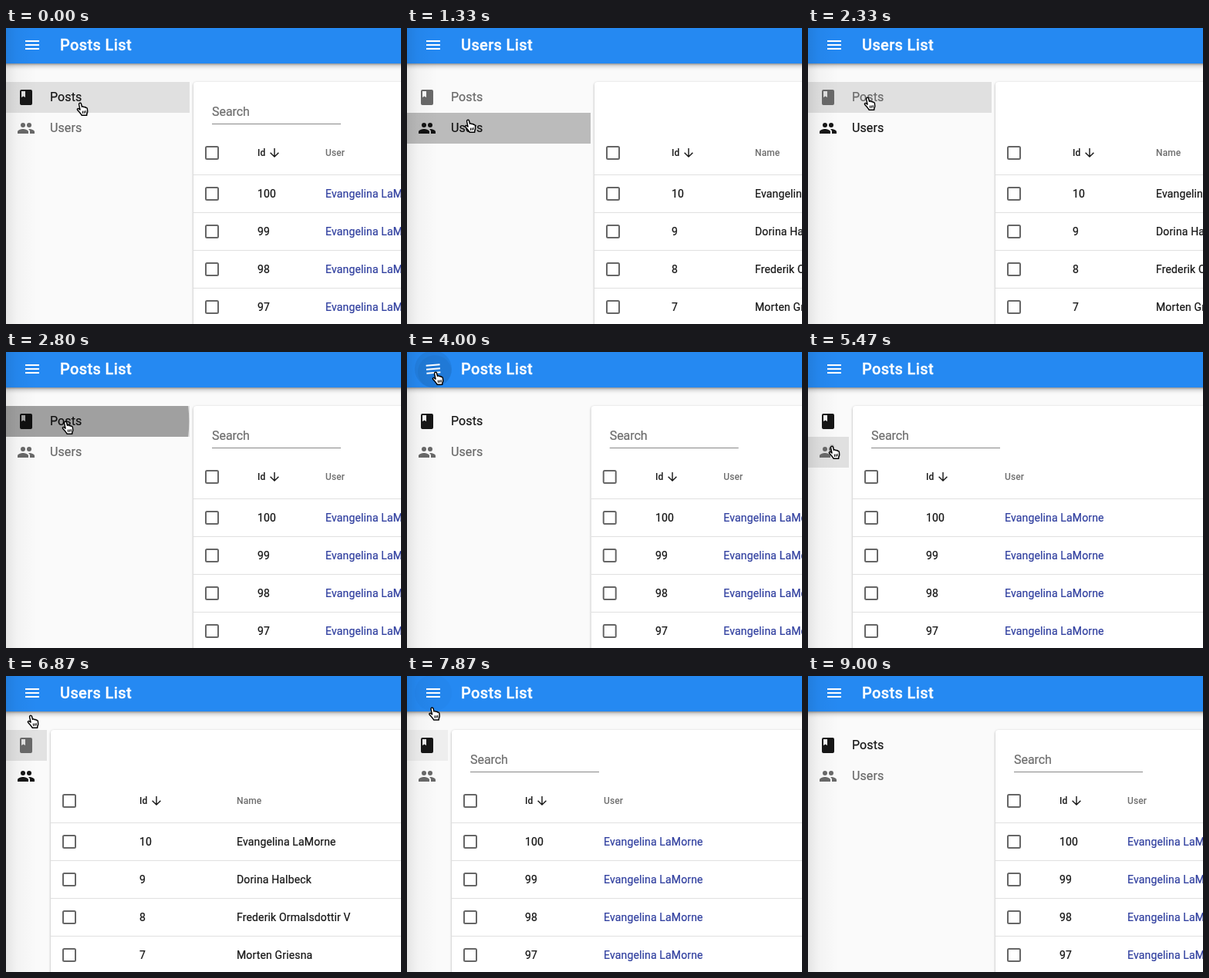
Write an HTML page that moves like this. It is 512 px wide and 384 px high and loops after 9740 ms.

```html
<!DOCTYPE html>
<html lang="en">
<head>
<meta charset="utf-8">
<title>Admin menu</title>
<style>
  html, body { margin: 0; width: 100%; height: 100%; overflow: hidden; background: #fafafa; }
  svg { display: block; width: 512px; height: 384px; }
  text {
    font-family: Roboto, sans-serif; font-size: 14px; letter-spacing: .15px; white-space: pre;
    color: #161616; fill: currentColor; stroke: currentColor; stroke-width: .22px;
  }
  .title { font-size: 20px; font-weight: 500; color: #fff; letter-spacing: .36px; stroke-width: .35px; }
  .menu { font-size: 16px; letter-spacing: .1px; }
  .hint { font-size: 16px; letter-spacing: -.05px; color: #6e6e6e; }
  .head { font-size: 12px; font-weight: 500; color: #6e6e6e; letter-spacing: .1px; stroke-width: 0; }
  .sorted { color: #161616; }
  .link { color: #303f9f; }
  .card { filter: drop-shadow(0 1px 1.5px rgba(0, 0, 0, .32)); }
  .bar { filter: drop-shadow(0 1px 1px rgba(0, 0, 0, .25)) drop-shadow(0 2px 3px rgba(0, 0, 0, .32)); }
</style>
</head>
<body>
<svg id="stage" viewBox="0 0 512 384">
  <defs>
    <linearGradient id="shade">
      <stop offset="0" stop-opacity=".085"/>
      <stop offset=".35" stop-opacity=".028"/>
      <stop offset="1" stop-opacity="0"/>
    </linearGradient>
    <clipPath id="side"><rect id="sideBox" y="46" height="338"/></clipPath>
    <clipPath id="row0"><rect class="rowBox" y="70" height="40"/></clipPath>
    <clipPath id="row1"><rect class="rowBox" y="110" height="40"/></clipPath>
    <clipPath id="round"><circle cx="34" cy="22" r="24"/></clipPath>
  </defs>
  <rect width="512" height="384" fill="#fafafa"/>

  <g clip-path="url(#side)">
    <rect class="hover" y="70" width="240" height="40"/>
    <rect class="hover" y="110" width="240" height="40"/>
    <g class="item">
      <path transform="translate(14 78)" fill-rule="evenodd"
        d="M18 2H6a2 2 0 0 0-2 2v16a2 2 0 0 0 2 2h12a2 2 0 0 0 2-2V4a2 2 0 0 0-2-2zM6 4h5v8l-2.500-1.500L6 12z"/>
      <text class="menu" x="57" y="95">Posts</text>
    </g>
    <g class="item">
      <g transform="translate(14 118)">
        <circle cx="8" cy="8" r="3"/>
        <circle cx="16" cy="8" r="3"/>
        <path d="M8 13c-2.300 0-7 1.200-7 3.500V19h14v-2.500C15 14.200 10.300 13 8 13z"/>
        <path d="M16 13h-1c1.200.9 2 2 2 3.500V19h6v-2.500C23 14.200 18.300 13 16 13z"/>
      </g>
      <text class="menu" x="57" y="135">Users</text>
    </g>
    <g clip-path="url(#row0)"><circle class="wave"/></g>
    <g clip-path="url(#row1)"><circle class="wave"/></g>
  </g>

  <g id="panel">
    <rect class="card" y="70" width="520" height="330" rx="4" fill="#fff"/>
    <g id="grid"></g>
  </g>

  <rect class="bar" x="-8" y="-8" width="528" height="54" fill="#2589f2"/>
  <rect width="40" height="384" fill="url(#shade)"/>
  <circle id="halo" cx="34" cy="22" r="24"/>
  <g clip-path="url(#round)"><circle class="wave"/></g>
  <path id="burger" d="M25 17h18M25 22h18M25 27h18" stroke="#fff" stroke-width="2"/>
  <text class="title" id="title" x="70" y="28.500"></text>

  <g id="hand">
    <g transform="translate(-.5 0) scale(1.06)">
      <path d="M3.200 1.600c.9-.8 2.200-.4 2.500.7l.9 3.600c1-.7 2-.4 2.300.4 1-.5 1.900-.1 2.200.7 1-.3 1.900.2 2 1.300l.3 3c.1 1.600-.6 2.400-.9 3.400v1.600H6.300c-.5-1.600-2-2.700-3-4.100L1 9.600C.3 8.600 1.600 7.500 2.600 8.200l1.700 1.300L3 3.600c-.2-.8-.2-1.500.2-2z"
        fill="#fff" stroke="#000" stroke-width="1.350" stroke-linejoin="round"/>
      <path d="M7.300 11l.4 3M9.200 10.800l.3 3M11 10.500l.2 3" stroke="#000"/>
    </g>
  </g>
</svg>
<script>
const LOOP = 9740, TICK = 200 / 3;
const $ = id => document.getElementById(id);
const all = q => [...document.querySelectorAll(q)];

const pages = [
  { title: 'Posts List', column: 'User', ids: [100, 99, 98, 97],
    names: Array(4).fill('Evangelina LaMorne'), style: 'link', wide: [83, 171], slim: [95, 197] },
  { title: 'Users List', column: 'Name', ids: [10, 9, 8, 7],
    names: ['Evangelina LaMorne', 'Dorina Halbeck', 'Frederik Ormalsdottir V', 'Morten Griesna'],
    style: '', wide: [100, 208], slim: [115, 241] }
];

// Times in ms
const moves = [[0, 92, 96], [70, 92, 96], [400, 75, 118], [1730, 75, 118], [2000, 73, 89],
  [3330, 73, 89], [3530, 33, 25], [4670, 33, 25], [5130, 27, 121], [6670, 27, 121],
  [6867, 28, 50], [6940, 29, 30], [7070, 27, 84], [7730, 27, 84], [7930, 29, 26],
  [8730, 29, 26], [9000, 522, 310]];
const hovers = [
  [[-300, 220], [1830, 3370], [4770, 4900], [6690, 6860], [6990, 7800]],
  [[220, 1830], [4900, 6730]],
  [[3440, 4730], [6900, 6980], [7830, 8750]]
];
const waves = [
  [[2330, 2760, 78, 90, 161], [7070, 7150, 32, 86, 42]],
  [[760, 1180, 80, 119, 162], [5380, 5800, 31, 123, 42]],
  [[3670, 4100, 36, 26, 30], [8000, 8250, 34, 27, 30]]
];
const switches = [1000, 2530, 5670, 7200];
const shut = [3965, 195], reopen = [8130, 225];

const clamp = v => Math.max(0, Math.min(1, v));
const ease = u => u < .5 ? 4 * u ** 3 : 1 - (2 - 2 * u) ** 3 / 2;
const smooth = u => u * u * (3 - 2 * u);
const ramp = (t, start, span) => clamp((t - start) / span);

const box = y =>
  `<rect x="16" y="${y - 8}" width="16" height="16" rx="1.500" fill="none" stroke="#666" stroke-width="2"/>`;

function buildPage(p, i) {
  let fixed = box(162), first = '', second = '';
  if (!i) fixed += '<text class="hint" x="24" y="114">Search</text><path d="M24 124.500h167" stroke="#888"/>';
  first += '<text class="head sorted" y="166">Id</text>' +
    '<path d="M22 156v11M16.600 161.700l5.400 5.400 5.400-5.400" fill="none" stroke="#161616" stroke-width="1.400"/>';
  second += `<text class="head" y="166">${p.column}</text>`;
  p.ids.forEach((id, r) => {
    const y = 215 + 49 * r;
    fixed += `<path d="M0 ${y - 24.5}h520" stroke="#e0e0e0"/>` + box(y);
    first += `<text y="${y + 5}">${id}</text>`;
    second += `<text class="${p.style}" y="${y + 5}">${p.names[r]}</text>`;
  });
  return `<g class="page">${fixed}<g class="col">${first}</g><g class="col">${second}</g></g>`;
}
$('grid').innerHTML = pages.map(buildPage).join('');

const pageEls = all('.page'), cols = all('.col'), items = all('.item');
const hoverEls = [...all('.hover'), $('halo')], waveEls = all('.wave'), rowBoxes = all('.rowBox');
const hoverDepth = [.105, .105, .07];
const waveDepth = [.3, .3, .06];

function drawHand(t) {
  const hand = $('hand');
  const n = moves.findIndex(m => m[0] > t);
  hand.style.display = n < 0 ? 'none' : '';
  if (n < 0) return;
  const [t0, x0, y0] = moves[n - 1], [t1, x1, y1] = moves[n];
  const u = smooth((t - t0) / (t1 - t0));
  hand.setAttribute('transform', `translate(${x0 + (x1 - x0) * u} ${y0 + (y1 - y0) * u})`);
}

function drawWave(el, list, depth, t) {
  const w = list.filter(v => v[0] <= t).pop();
  if (!w) return el.setAttribute('fill-opacity', 0);
  const [start, fade, x, y, size] = w;
  const grow = smooth(ramp(t, start, 500));
  const left = 1 - smooth(ramp(t, fade, 330));
  el.setAttribute('cx', x);
  el.setAttribute('cy', y);
  el.setAttribute('r', size * grow);
  el.setAttribute('fill-opacity', depth * (.3 + .7 * grow) * left);
}

function draw(t) {
  const page = switches.filter(s => s <= t).length % 2;
  const closed = ease(ramp(t, ...shut)) - ease(ramp(t, ...reopen));
  const left = 243 - 185 * closed;

  $('title').textContent = pages[page].title;
  $('panel').setAttribute('transform', `translate(${left} 0)`);
  $('sideBox').setAttribute('width', left - 5);
  rowBoxes.forEach(r => r.setAttribute('width', left - 5));
  $('burger').setAttribute('transform', `rotate(${-180 * closed} 34 22)`);

  pages.forEach((p, i) => {
    pageEls[i].style.display = i === page ? '' : 'none';
    const color = i === page ? '#161616' : '#696969';
    items[i].setAttribute('fill', color);
    items[i].lastElementChild.style.color = color;
    p.wide.forEach((x, c) =>
      cols[i * 2 + c].setAttribute('transform', `translate(${x + (p.slim[c] - x) * closed} 0)`));
  });

  hoverEls.forEach((el, i) => {
    const level = Math.max(...hovers[i].map(([on, off]) => ramp(t, on, 120) - ramp(t, off, 120)));
    el.setAttribute('fill-opacity', hoverDepth[i] * level);
  });
  waveEls.forEach((el, i) => drawWave(el, waves[i], waveDepth[i], t));
  drawHand(t);
}

const begin = performance.now();
function loop(now) {
  const t = Math.max(0, now - begin) % LOOP;
  draw(Math.floor((t + 4) / TICK) * TICK);
  requestAnimationFrame(loop);
}
draw(0);
requestAnimationFrame(loop);
</script>
</body>
</html>
```
